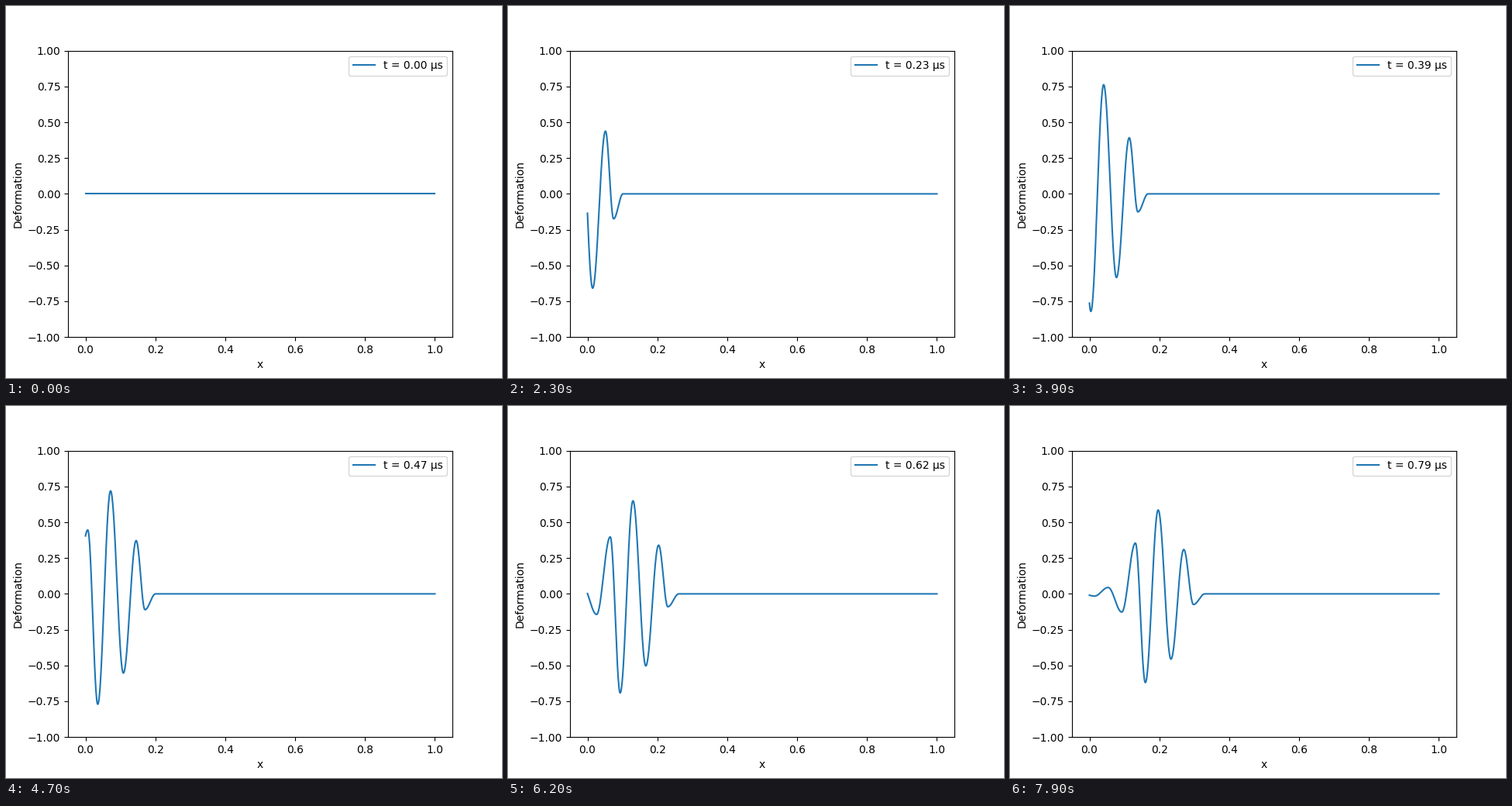
Write a matplotlib script that moves like this. It is 640 px wide and 480 px high and loops after 8 s.

```python
import numpy as np
import matplotlib.pyplot as plt
from matplotlib.animation import FuncAnimation

FRAMES = 80
STEP = 0.01      # microseconds per frame
SPEED = 0.39     # x units per microsecond
SWITCH_OFF = 0.384

# Emission times of the extremes: onset, driven burst, free ringing.
onset = [0.042]
burst = 0.098 + 0.094 * np.arange(4)
ringing = 0.453 + 0.1 * np.arange(5)
born = np.concatenate((onset, burst, ringing))[::-1]

# The head of the pulse runs slightly faster and fades sooner.
head = born == onset[0]
speed = np.where(head, 1.02, 1) * SPEED
loss = np.where(head, 11, 2.1)
sign = (-1) ** np.arange(len(born))[::-1] * -1


def drive(t):
    """Amplitude at the boundary: slow build-up, then ring-down."""
    past = 0.02 * np.log1p(np.exp((t - SWITCH_OFF) / 0.02))
    return 1.55 * np.sqrt(t) * np.exp(-12 * past)


def wave(x, t):
    """Half-cosine arcs through the travelling extremes, zero past the front."""
    pos = speed * (t - born)
    height = sign * drive(born) / (1 + loss * np.maximum(pos, 0))
    front = SPEED * t + 0.04 * np.sqrt(SPEED * t)
    px, py = np.append(pos, front), np.append(height, 0)

    phase = np.interp(x, px, np.arange(len(px)))
    i = np.minimum(phase.astype(int), len(px) - 2)
    ease = (1 - np.cos(np.pi * (phase - i))) / 2
    return py[i] + (py[i + 1] - py[i]) * ease


fig, ax = plt.subplots(figsize=(6.4, 4.8), dpi=100)
x = np.linspace(0, 1, 1001)
line, = ax.plot(x, np.zeros_like(x), label="t = 0.00 µs")
ax.set_xlim(-0.05, 1.05)
ax.set_ylim(-1, 1)
ax.set_xlabel("x")
ax.set_ylabel("Deformation")
label = ax.legend(loc="upper right").get_texts()[0]


def update(frame):
    t = frame * STEP
    line.set_ydata(wave(x, t))
    label.set_text(f"t = {t:.2f} µs")
    return line, label


anim = FuncAnimation(fig, update, frames=FRAMES, init_func=lambda: update(0),
                     interval=100, repeat=True, repeat_delay=0)
plt.show()
```
